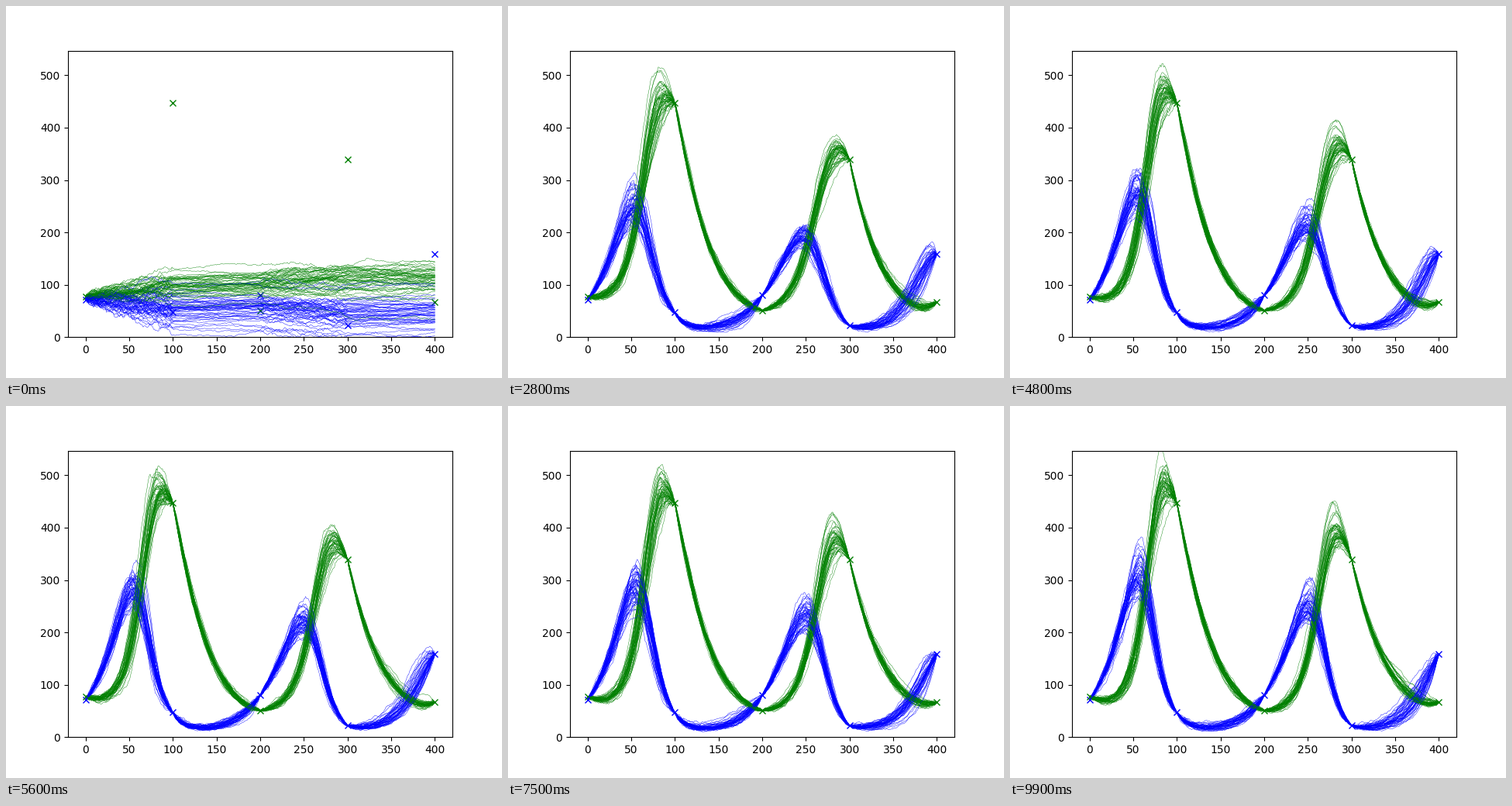
Recreate the animation shown at these times as a matplotlib script. Size 640 by 480 pixels, loop 10000 ms.

```python
import numpy as np
import matplotlib.pyplot as plt
from matplotlib.animation import FuncAnimation

FRAMES, PATHS, SEG, DT = 100, 50, 100, 0.1
WARM_UP, EARLY = 4, 15
COLORS = ("blue", "green")
OBS_T = np.arange(5) * SEG
OBS = np.array([[71, 47, 80, 22, 158], [78, 447, 51, 339, 67]])
RATE = 0.0025  # predation

# Prey growth and predator death per observation interval, early and late in training
GROWTH = np.array([[0.50, 0.50, 0.37, 0.64], [0.50, 0.50, 0.43, 0.60]])
DEATH = np.array([[0.18, 0.30, 0.09, 0.32], [0.29, 0.30, 0.19, 0.27]])
NOISE = 0.5
PIN = 4  # how late a path bends towards the next observation

t = np.arange(4 * SEG + 1)


def untrained(rng):
    """Plain random walks that ignore the observations."""
    ends = ([73, 50, 50, 38, 38], [78, 95, 98, 106, 107])
    mean = np.array([np.interp(t, OBS_T, e) for e in ends])
    sd = np.repeat([[2.2, 0.5, 1.3, 0.5], [1.5, 0.6, 1.1, 0.8]], SEG, axis=1)
    steps = rng.standard_normal((2, 4 * SEG, PATHS)) * sd[:, :, None]
    walk = np.pad(steps.cumsum(axis=1), ((0, 0), (1, 0), (0, 0)))
    return np.maximum(mean[:, :, None] + walk, 0)


def trained(rng, f):
    """Noisy Lotka-Volterra paths, pinned to the observations."""
    s = np.sqrt(max(f - EARLY, 0) / (FRAMES - 1 - EARLY))
    grow, die = (((1 - s) * p[0] + s * p[1])[:, None] for p in (GROWTH, DEATH))
    goal = np.log(OBS)
    log = np.empty((SEG + 1, 2, 4, PATHS))
    log[0] = goal[:, :4, None]
    kick = NOISE * np.sqrt(DT) * rng.standard_normal((SEG, 2, 4, PATHS))
    for i in range(SEG):
        x, y = np.exp(log[i])
        dy = (RATE * x - die) * DT + kick[i, 1] * np.sqrt((die + RATE * x) / y)
        log[i + 1, 1] = log[i, 1] + dy
        y = np.exp(log[i + 1, 1])
        dx = (grow - RATE * y) * DT + kick[i, 0] * np.sqrt((grow + RATE * y) / x)
        log[i + 1, 0] = log[i, 0] + dx
    u = np.linspace(0, 1, SEG + 1)[:, None, None, None]
    log += u ** PIN * (goal[:, 1:, None] - log[-1])
    # join the four intervals into one time axis
    body = log[:-1].transpose(1, 2, 0, 3).reshape(2, 4 * SEG, PATHS)
    return np.exp(np.concatenate([body, log[-1, :, 3:]], axis=1))


def sample(f):
    rng = np.random.default_rng(100 + f)
    w = min(f / WARM_UP, 1)
    if w == 0:
        return untrained(rng)
    paths = trained(rng, f)
    return paths if w == 1 else (1 - w) * untrained(rng) + w * paths


fig, ax = plt.subplots(figsize=(6.4, 4.8), dpi=100)
for obs, color in zip(OBS, COLORS):
    ax.plot(OBS_T, obs, "x", color=color)
lines = [[ax.plot([], [], color=c, lw=0.3)[0] for c in COLORS] for _ in range(PATHS)]
ax.set_ylim(0, 547.1)


def update(f):
    paths = sample(f)
    for p, pair in enumerate(lines):
        for k, line in enumerate(pair):
            line.set_data(t, paths[k, :, p])
    return [line for pair in lines for line in pair]


anim = FuncAnimation(fig, update, frames=FRAMES, interval=1000 * DT, repeat=True)
plt.show()
```
